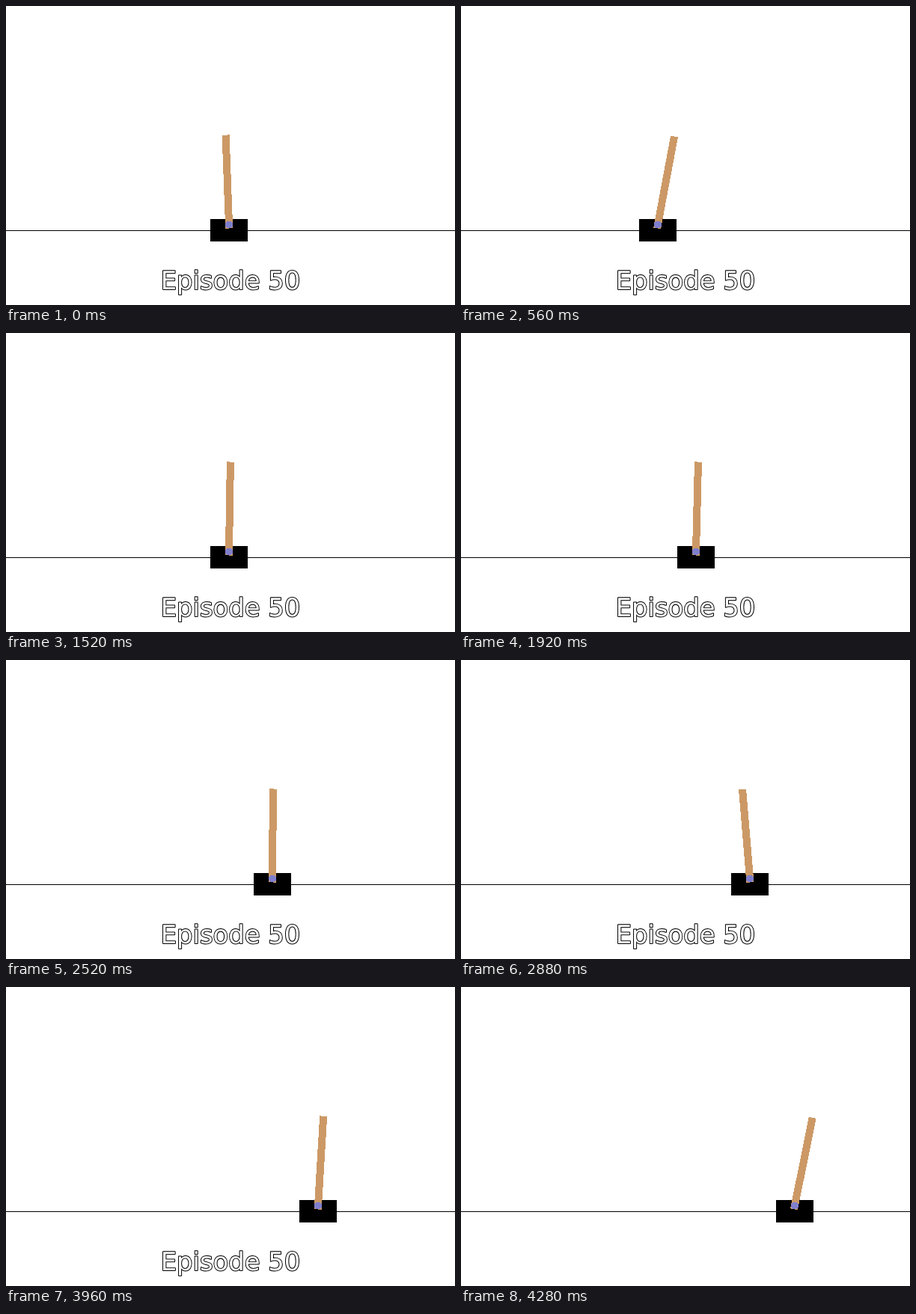
An HTML page that plays this animation: 600x400 px, repeating every 4.32 s.

```html
<!DOCTYPE html>
<html lang="en">
<head>
<meta charset="utf-8">
<title>Cart pole</title>
<style>
html, body { margin: 0; width: 100%; height: 100%; overflow: hidden; background: #fff; }
svg { display: block; }
text {
  font: 33.8px "DejaVu Sans", sans-serif;
  text-anchor: middle;
  text-rendering: geometricPrecision;
  fill: #fff;
  stroke: #000;
  stroke-width: 2px;
  stroke-linejoin: round;
  paint-order: stroke;
}
</style>
</head>
<body>
<svg width="600" height="400" viewBox="0 0 600 400">
  <g shape-rendering="crispEdges">
    <rect y="300" width="600" height="1"/>
    <g id="cart">
      <rect x="-25" y="285" width="50" height="30"/>
      <g transform="translate(0 292.5)">
        <rect id="pole" x="-5" y="-120" width="10" height="125" fill="rgb(204,153,102)"/>
        <circle r="5" fill="rgb(127,127,204)"/>
      </g>
    </g>
  </g>
  <text id="label" x="300" y="379">Episode 50</text>
</svg>
<script>
const [cart, pole, label] = ['cart', 'pole', 'label'].map(id => document.getElementById(id));
const LOOP = 4320, STEP = 40;

// Key poses: time in ms, cart centre in px, pole lean in radians
const poses = [
  [0, 298, -.037], [160, 303.5, -.13], [500, 264, .188], [800, 271, .06],
  [1080, 278, .067], [1400, 297, -.02], [1680, 298.5, .07], [1920, 314, .025],
  [2520, 356, .008], [2880, 386, -.083], [3400, 383, .08], [3560, 387, .094],
  [3960, 417, .06], [4280, 446, .198]
];
const last = poses.length - 1;

function secant(i, k) {
  const a = poses[i], b = poses[i + 1];
  return (b[k] - a[k]) / (b[0] - a[0]);
}

// Slope at a pose, from the parabola through it and its neighbours
function slope(i, k) {
  if (i === 0) return secant(0, k);
  if (i === last) return secant(last - 1, k);
  const before = poses[i][0] - poses[i - 1][0];
  const after = poses[i + 1][0] - poses[i][0];
  return (secant(i - 1, k) * after + secant(i, k) * before) / (before + after);
}

function sample(t, k) {
  const next = poses.findIndex(p => p[0] > t);
  const i = next < 0 ? last - 1 : next - 1;
  const a = poses[i], b = poses[i + 1], h = b[0] - a[0];
  const u = (t - a[0]) / h, w = 1 - u;
  return w * w * (1 + 2 * u) * a[k] + u * u * (1 + 2 * w) * b[k]
    + h * u * w * (w * slope(i, k) - u * slope(i + 1, k));
}

function draw(t) {
  const lean = sample(t, 2) * 180 / Math.PI;
  cart.setAttribute('transform', `translate(${Math.round(sample(t, 1))} 0)`);
  pole.setAttribute('transform', `rotate(${lean})`);
  label.setAttribute('visibility', t < LOOP - STEP ? 'visible' : 'hidden');
}

const start = performance.now();
function tick() {
  const t = (performance.now() - start) % LOOP;
  draw(Math.floor(t / STEP) * STEP);
  requestAnimationFrame(tick);
}
tick();
</script>
</body>
</html>
```
